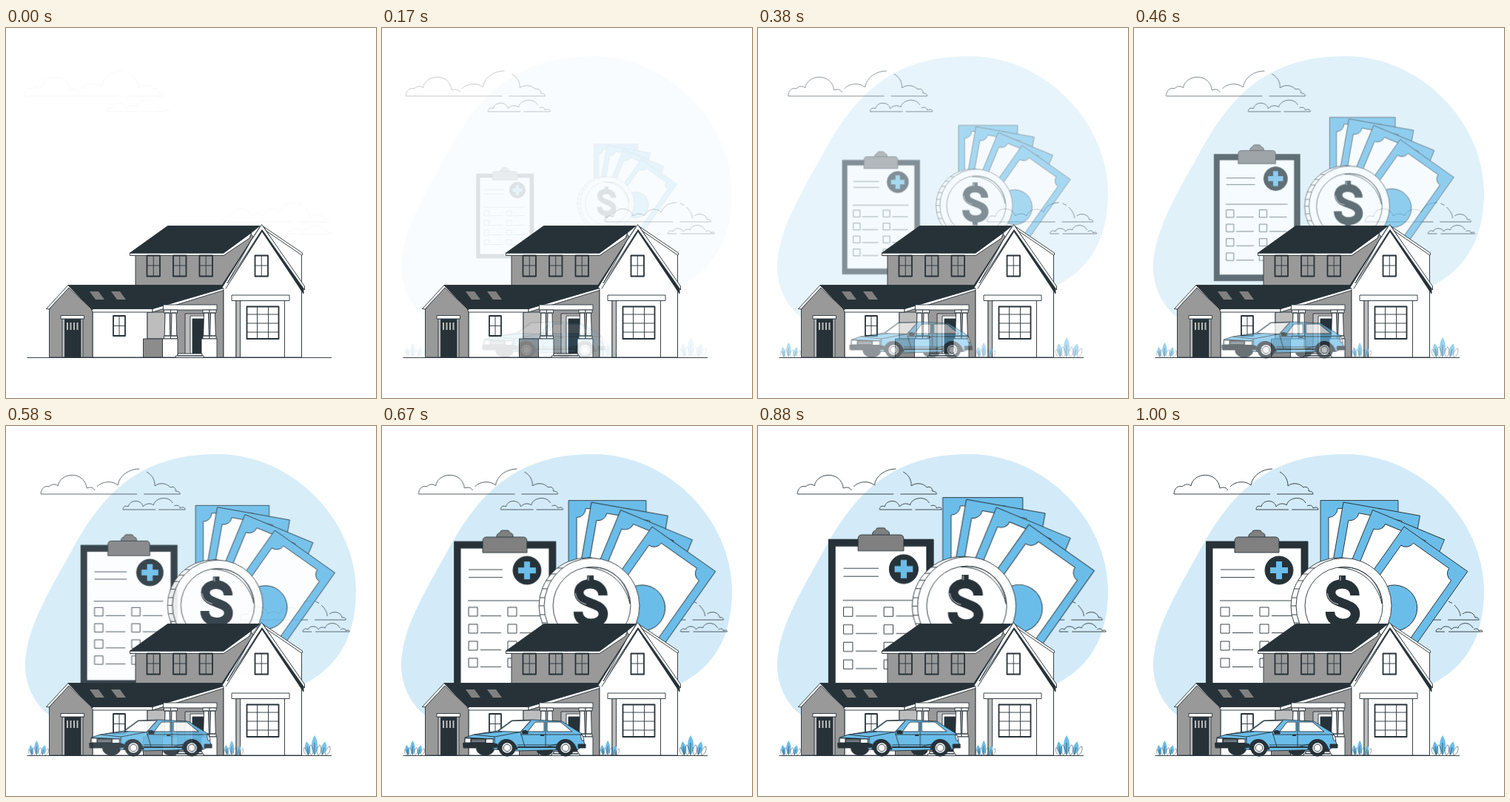
An HTML page for the animation above (1040 ms loop, 500 by 500 pixels).

```html
<!DOCTYPE html>
<html lang="en">
<head>
<meta charset="utf-8">
<title>House and savings</title>
<style>
html, body { margin: 0; width: 100%; height: 100%; overflow: hidden; background: #fff; }
svg { display: block; width: 100vw; height: 100vh; fill: none; stroke: #263238; stroke-width: .9; stroke-linejoin: round; }
.w { fill: #fff; }
.g { fill: #999; }
.l { fill: #bdbdbd; }
.m { fill: #808080; }
.d { fill: #263238; }
.b { fill: #6bbde9; }
.n { stroke: none; }
.t { stroke-width: 1.8; }
.clouds, .fade, .zoom, .drive { animation: 1040ms linear infinite; }
.clouds { animation-name: slide; }
.fade { animation-name: fade; }
.zoom { animation-name: zoom; }
.drive { animation-name: drive; }
.clip { transform-origin: 166px 250px; }
.cash { transform-origin: 331px 230px; }
@keyframes slide {
  0% { opacity: .034; transform: translateX(-29.5px); animation-timing-function: cubic-bezier(.108, .18, .619, 1); }
  96.15%, 100% { opacity: 1; transform: none; }
}
@keyframes fade {
  0% { opacity: 0; animation-timing-function: cubic-bezier(.353, .042, .5, 1.373); }
  96.15%, 100% { opacity: 1; }
}
@keyframes zoom {
  0% { opacity: 0; transform: scale(.5); animation-timing-function: cubic-bezier(.353, .042, .5, 1.373); }
  96.15%, 100% { opacity: 1; transform: scale(1); }
}
@keyframes drive {
  0% { opacity: 0; transform: translateX(30px); animation-timing-function: cubic-bezier(.353, .042, .5, 1.373); }
  96.15%, 100% { opacity: 1; transform: translateX(0); }
}
</style>
</head>
<body>
<svg viewBox="0 0 500 500">
<defs>
  <g id="bill">
    <path class="b" d="M0 0H105V195H0Z"/>
    <path class="w" d="M23 11H82A12 12 0 0 0 94 23V172A12 12 0 0 0 82 184H23A12 12 0 0 0 11 172V23A12 12 0 0 0 23 11Z"/>
    <circle class="b" cx="52.5" cy="97.5" r="31"/>
  </g>
  <path id="row" d="M117 245h12v12h-12ZM133 256.500h28M170 245h12v12h-12ZM186 256.500h28"/>
  <g id="pane">
    <path class="t" d="M0 0H17.500V28H0Z"/>
    <path d="M8.750 0V28M0 13.500H17.500"/>
  </g>
  <path id="leaf" d="M0 0C-5 -5 -5 -13 0 -19C5 -13 5 -5 0 0Z"/>
  <g id="bush" stroke-width=".7">
    <g class="b n">
      <use href="#leaf" transform="translate(15 0) scale(1.1 1.42)"/>
      <use href="#leaf" transform="translate(7 0) rotate(-9)"/>
      <use href="#leaf" transform="translate(25 0) rotate(14)"/>
    </g>
    <path d="M15 0V-17M7 0L5 -12M25 0L28 -11"/>
    <use href="#leaf" transform="translate(5 0) rotate(-22) scale(.6)"/>
    <use href="#leaf" transform="translate(11 0) rotate(-5) scale(.75)"/>
    <use href="#leaf" transform="translate(20 0) rotate(8) scale(.75)"/>
    <use href="#leaf" transform="translate(30 0) rotate(25) scale(.7)"/>
  </g>
  <g id="wheel">
    <circle class="d" r="11.200"/>
    <circle class="w" r="7.200"/>
    <circle class="w" r="4.800"/>
  </g>
  <g id="post">
    <path class="w" d="M1.500 385h6l.8 31h-7.600ZM0 381h9v4H0ZM0 416h9v4H0Z"/>
  </g>
</defs>

<path class="fade n" fill="#d3ebf8" d="M285 38C390 38 473 130 473 222C473 290 445 328 400 350C300 400 120 430 60 392C32 372 22 335 27 308C33 265 60 220 88 170C130 92 180 38 285 38Z"/>

<g class="clouds">
  <path d="M184 92H54C54 84 60 80 65 82M65 82C69 78 74 78 77 81C80 62 113 60 116 84C121 82 125 83 127 87M130 82C136 75 150 73 158 80C160 66 174 58 187 58M197 62C204 66 208 72 208 81C214 76 224 77 229 83M229 83C233 81 237 84 236 88C239 88 242 89 242 92H193"/>
  <path d="M209 113H165C165 109 168 107 172 109C174 99 190 99 192 109C196 104 203 104 206 107C209 96 227 94 232 104M234 108C238 106 242 108 242 111C246 109 249 110 249 113H213"/>
  <path d="M415 262H323C323 255 329 252 334 255C336 242 356 240 361 254C365 250 373 250 376 254C381 243 394 243 399 249C402 240 411 236 420 236M425 237L430 239.500M433 242C438 247 441 252 441 257M444 254C450 249 460 252 461 259C464 258 466 260 466 262H424"/>
  <path d="M420 278H408C408 274 412 273 415 275C417 269 427 270 429 275C431 272 435 271 438 273C440 265 454 264 458 273M459 275C463 273 466 274 466 277C469 275 471 276 471 278H425"/>
</g>

<g class="zoom clip">
  <path class="d" d="M97.500 156H235V358.500H97.500Z"/>
  <path class="w" d="M106 165H226V349H106Z"/>
  <path class="m" d="M155 151V148C156 144 160 145 160 142.500Q160 141 163 141H169Q172 141 172 142.500C172 145 177 144 177 148V151Z"/>
  <path class="m" d="M141 150H191Q196 150 196 156V171H136V156Q136 150 141 150Z"/>
  <path d="M117 194H163M117 204.500H163M116 236H215"/>
  <circle class="d" cx="196" cy="195" r="19"/>
  <path class="b n" d="M192 183h8v8h8v8h-8v8h-8v-8h-8v-8h8Z"/>
  <use href="#row"/>
  <use href="#row" y="23"/>
  <use href="#row" y="46"/>
  <use href="#row" y="69"/>
</g>

<g class="zoom cash">
  <use href="#bill" transform="translate(252 100.500)"/>
  <use href="#bill" transform="translate(283 103) rotate(10)"/>
  <use href="#bill" transform="translate(322.500 113.500) rotate(22.500)"/>
  <use href="#bill" transform="translate(365 136) rotate(35.200)"/>
  <circle class="w" cx="277" cy="243" r="65"/>
  <path class="w n" d="M277 178.400H284V307H277Z"/>
  <path d="M277 178H284M237 192h7M228.300 200h7M221.700 209h7M216.200 220h7M213 232h7M212 243h7M213 255h7M216 266h7"/>
  <circle class="w" cx="283.500" cy="243" r="64.500"/>
  <circle cx="283.500" cy="243" r="52.500"/>
  <path d="M276 191.500C309 186 333 212 335 240C328 211 306 192 276 191.500Z"/>
  <path stroke-width="12.500" stroke-linejoin="miter" d="M298.500 229C298.500 209 266 209 266 225C266 242 299 237 299 254C299 271 265 272 265 251"/>
  <path class="d n" d="M277 202h9v10h-9ZM277 266h9v12h-9Z"/>
  <path stroke="#fff" stroke-width=".8" d="M279 203V209M261.500 226C262 235 269 239 276 241"/>
</g>

<!-- house -->
<path d="M28.500 445.500H440"/>
<path class="w" d="M346 267L400.500 304V306.500H399.500V445H294V340Z"/>
<path d="M347 271L399 306.500"/>
<path class="g" d="M175 306H294L331 278L335 284L294 352H175Z"/>
<path class="w" d="M294 304L332 276L329 284L294 307.500H167.500V304Z"/>
<path class="d" d="M218.500 267.500H343L331 277L294 304H167.500Z"/>
<use href="#pane" x="190.500" y="307.500"/>
<use href="#pane" x="226" y="307.500"/>
<use href="#pane" x="261.500" y="307.500"/>

<path class="w" d="M117 379H191.500V445H117Z"/>
<path class="g" d="M191 382L294 352V445H191Z"/>
<path class="l" d="M191 384H215V420H191Z"/>
<path class="l" d="M242 386H268V441H242Z"/>
<path class="w" d="M249 389H268V441H249Z"/>
<path class="d" d="M252 393H267V441H252Z"/>
<path class="g" d="M58.500 380L85 349L117 380V445H58.500Z"/>
<path class="w" d="M115 379H198V384H117Z"/>
<path class="w" d="M198 379L293 350L297 353.500L198 384Z"/>
<path class="w" d="M54.500 379.500L84 347.500L115 379H117V381L85 351L58 380Z"/>
<path class="d" d="M84 347.500H292L296 351L198 379.500H115.500Z"/>
<path class="m n" d="M113 356h12l8 11h-12ZM142 356h12l8 11h-12Z"/>

<path class="l" d="M76 393H104V445H76Z"/>
<path class="w" d="M74 388.500H105.500V393H74Z"/>
<path class="d" d="M79.500 393.500H101V445H79.500Z"/>
<path stroke="#bdbdbd" stroke-width="2" d="M83 398V408M87.500 398V408M92 398V408M96.500 398V408"/>
<path class="t" d="M145 389H161V416H145Z"/>
<path d="M153 389V416M145 402.500H161"/>

<path class="w" d="M212.500 374H285V381H212.500Z"/>
<use href="#post" x="213.500"/>
<use href="#post" x="222.500"/>
<use href="#post" x="266"/>
<use href="#post" x="275"/>
<path fill="#8c8c8c" d="M185.500 420H211.500V445H185.500Z"/>
<path class="w" d="M211.500 420H232V445H211.500ZM264 420H285V445H264Z"/>
<path class="w" d="M232 440H265V443H232ZM229.500 443H267V445.500H229.500Z"/>

<path class="w" d="M345.500 270L294 352V445H399.500V355Z"/>
<path class="d" d="M343.500 268L291 349L297 352L346 275L402 359V351L349 270Z"/>
<path class="w" d="M345.500 266L403 349V353L346 272L296 353L292.500 350.500L332 287Z" fill="none" stroke="none"/>
<path class="w" d="M345.500 265.500L403.500 349V354L346 272.500L299 345L331 287.500Z"/>
<use href="#pane" x="336.500" y="307.500"/>

<path class="w" d="M311 368H376.500V445H311Z"/>
<path class="l" d="M311 368H316.500V445H311Z"/>
<path class="w" d="M305 361H383V368.500H305Z"/>
<path class="t" d="M325.500 376.500H368.500V420H325.500Z"/>
<path d="M339.500 376V420M354.500 376V420M325 387H369M325 399H369M325 411H369"/>

<g class="fade">
  <use href="#bush" transform="translate(402 445)"/>
  <use href="#bush" transform="translate(30 445) scale(.76 .74)"/>
  <use href="#bush" transform="translate(294 445) scale(.74)"/>
</g>

<!-- car -->
<g class="drive">
  <ellipse class="d" cx="139.500" cy="436" rx="12" ry="9"/>
  <ellipse class="d" cx="220" cy="438" rx="11" ry="7"/>
  <path class="b" d="M111 429L112 421L124 417L156 412L175 398L203 397L243 399L270 416L274 431L264 437L183 439L152 437L146 433H112Z"/>
  <path class="w" d="M157 412.500L176 398.500L201 398L187 413.500Z"/>
  <path class="w" d="M197 413L206 401Q207 400 209 400H219V413Z"/>
  <path class="w" d="M223 400H241L257 413H223Z"/>
  <path d="M187 413.500L201 398M221 399V435M187 413.500L193 434H221L236 430M187 417H270M124 417L152 420L187 413.500M152 420V434M112 421L152 423M183 431H236M131 416L162 413"/>
  <path class="w" d="M112 422H120V428H112ZM140 423H150V429H140Z"/>
  <path class="d" d="M120 422.500H140V428.500H120Z"/>
  <path stroke="#fff" stroke-width=".6" d="M121 424.500H139M121 426.500H139"/>
  <path class="d" d="M109.500 428.500H150L156 430V434L149 435H110Z"/>
  <path class="d" d="M265 430H275V435H265Z"/>
  <path class="d" d="M189 413Q190 411 194 411.500L197 413V416H190Z"/>
  <path class="d n" d="M214 417h5v2h-5ZM183 433H237V435H183Z"/>
  <path class="w" d="M268 417L271 418L273 425H270Z"/>
  <path class="d" d="M156 437C155 420 178 418 183 437ZM235 437C235 420 258 418 263 437Z"/>
  <use href="#wheel" x="169" y="435"/>
  <use href="#wheel" x="248" y="435"/>
</g>
</svg>
</body>
</html>
```
